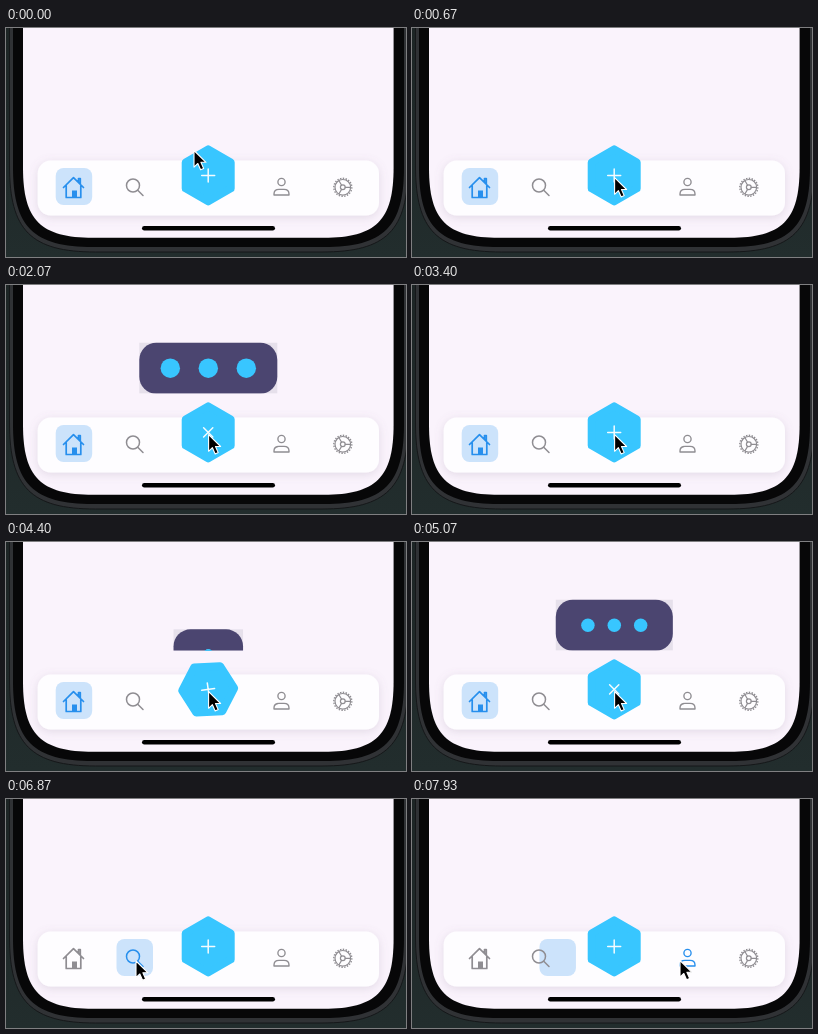
Write an HTML page that moves like this. It is 400x229 px and loops after 8 s.

```html
<!DOCTYPE html>
<html lang="en">
<head>
<meta charset="utf-8">
<title>Tab bar with expanding menu</title>
<style>
  html, body { margin: 0; width: 100%; height: 100%; overflow: hidden; background: #172121; }
  svg { display: block; width: 100%; height: 100%; }
  .line { fill: none; stroke: currentColor; stroke-width: 1.5; stroke-linecap: round; stroke-linejoin: round; }
  .tab { color: #8f8d92; }
  .tab.active { color: #278fed; }
</style>
</head>
<body>
<svg viewBox="0 0 400 229">
  <defs>
    <linearGradient id="desk" x2="0" y2="1">
      <stop offset="0" stop-color="#1d2525"/>
      <stop offset="1" stop-color="#222d2d"/>
    </linearGradient>
    <filter id="soft" x="-10%" y="-40%" width="120%" height="180%">
      <feDropShadow dx="0" dy="2" stdDeviation="5" flood-color="#80708c" flood-opacity=".2"/>
    </filter>
    <clipPath id="aboveBar"><rect width="400" height="108.5"/></clipPath>
  </defs>

  <!-- phone -->
  <rect width="400" height="229" fill="url(#desk)"/>
  <path id="frame" fill="#303235" stroke="#151719"/>
  <path id="bezel" fill="#070708"/>
  <path id="screen" fill="#faf3fc"/>
  <rect x="136" y="197.9" width="133" height="4.6" rx="2.3" fill="#000"/>

  <!-- menu -->
  <g clip-path="url(#aboveBar)">
    <g id="menu">
      <rect class="panel" y="-25.5" height="51" fill="#e6e0eb"/>
      <rect class="panel" y="-25.5" height="51" rx="17" fill="#4b4570"/>
      <g fill="#38c6ff">
        <circle class="dot"/><circle class="dot"/><circle class="dot"/>
      </g>
      <g id="actions" class="line" color="#f4f2fa" style="stroke-width:1.2">
        <path d="M-47 -5.5h3.5l2 -2.5h5l2 2.5h3.5q2 0 2 2v9.5q0 2 -2 2h-16q-2 0 -2 -2v-9.5q0 -2 2 -2z"/>
        <circle cx="-39" cy="1" r="4.4"/><path d="M-32.5 -2.5h.4"/>
        <rect x="-3" y="-9" width="6.4" height="12" rx="3.2"/>
        <path d="M-5.5 -1v1.5a5.7 5.7 0 0 0 11.4 0V-1M.2 6.3V9M-3 9h6.4"/>
        <path d="M33.5 -6.8V6.8L45 0z"/>
      </g>
    </g>
  </g>

  <!-- tab bar -->
  <rect x="31.7" y="132.6" width="341.3" height="54.9" rx="13" fill="#fefdff" filter="url(#soft)"/>
  <rect id="highlight" y="140" width="36.5" height="37" rx="8" fill="#cce3fb"/>
  <g class="tab line" style="stroke-width:1.7">
    <path d="M57.5 159.5L67.5 149.7L77.5 159.5M60.2 157.5v12h14.6v-12M74.3 156v-5.5h-1.8v3.5"/>
    <rect x="66" y="162.5" width="5" height="7" fill="currentColor" stroke="none"/>
  </g>
  <g class="tab line">
    <circle cx="127" cy="157.5" r="6.5"/><path d="M132 162.5l5 5"/>
  </g>
  <g class="tab line" style="stroke-width:1.35">
    <circle cx="275.5" cy="154" r="3.6"/>
    <path d="M268 167v-1q0 -4.6 5 -4.6h5q5 0 5 4.6v1z"/>
  </g>
  <g class="tab line" transform="translate(336.8 159.3)" style="stroke-width:1.2">
    <circle r="7.8"/>
    <circle r="9" pathLength="40" stroke-dasharray="1 1" style="stroke-width:1.4;stroke-linecap:butt"/>
    <circle r="2.4"/>
    <path d="M2.4 0H7.5M-1.2 -2.1L-3.8 -6.5M-1.2 2.1L-3.8 6.5"/>
  </g>

  <!-- button -->
  <g transform="translate(202.2 147.4)">
    <path id="hexagon" d="M0 -26L22.5 -13V13L0 26L-22.5 13V-13z" fill="#38c6ff" stroke="#38c6ff" stroke-width="8" stroke-linejoin="round"/>
    <path id="plus" class="line" color="#f4fcff" d="M-6.5 0h13M0 -6.5v13"/>
  </g>

  <path id="cursor" d="M0 0V16.6L3.8 13L6.6 19.2L9.6 17.9L6.9 11.8H12z" fill="#000" stroke="#fff" stroke-width="1.1" stroke-linejoin="round"/>
</svg>

<script>
const LOOP = 8000;
const OPEN_TIME = 1600, CLOSE_TIME = 700, SPIN_TIME = 500;
const MENU_RUNS = [[700, 2700], [4250, 6060]];
const SELECT_SEARCH = 6050, SELECT_USER = 7835, SLIDE_TIME = 400;

// time, x, y
const CURSOR_PATH = [
  [0, 188, 122.5], [500, 202.6, 149.7], [5400, 202.6, 149.7], [5870, 147.5, 171],
  [6030, 130, 162], [7050, 130, 162], [7700, 268, 161.5], [LOOP, 268, 161.5]
];

const $ = id => document.getElementById(id);
const all = selector => [...document.querySelectorAll(selector)];
const panels = all('.panel'), dots = all('.dot'), tabs = all('.tab');

const lerp = (a, b, p) => a + (b - a) * p;
const progress = (t, start, duration) => Math.min(1, Math.max(0, (t - start) / duration));
const easeInOut = p => p < .5 ? 2 * p * p : 1 - 2 * (1 - p) ** 2;
const easeOut = p => 1 - (1 - p) ** 2;
const eased = (t, start, duration) => easeInOut(progress(t, start, duration));

// Phone outline with long, continuous bottom corners.
function shapePhone(id, left, right, bottom, corner) {
  const handle = corner / 4;
  $(id).setAttribute('d', `M${left} -9V${bottom - corner}
    C${left} ${bottom - handle} ${left + handle} ${bottom} ${left + corner} ${bottom}
    H${right - corner}
    C${right - handle} ${bottom} ${right} ${bottom - handle} ${right} ${bottom - corner}V-9z`);
}

function drawMenu(clock) {
  const rise = easeOut(progress(clock, 0, 620));
  const widen = eased(clock, 620, 330);
  const reveal = eased(clock, 1430, 160);
  const width = lerp(69.5, 138, widen);
  const firstDot = 5.5 * (1 - progress(clock, 150, 450));
  const radius = Math.max(firstDot, 9.7 * widen) * (1 - reveal);

  $('menu').setAttribute('transform', `translate(202.3 ${lerp(135, 83.2, rise)})`);
  for (const panel of panels) {
    panel.setAttribute('x', -width / 2);
    panel.setAttribute('width', width);
  }
  dots.forEach((dot, i) => {
    dot.setAttribute('cx', (i - 1) * 38 * widen);
    dot.setAttribute('r', radius);
  });
  $('actions').setAttribute('opacity', reveal);
}

function drawTabs(t) {
  const selected = t < SELECT_SEARCH ? 0 : t < SELECT_USER ? 1 : 2;
  tabs.forEach((tab, i) => tab.classList.toggle('active', i === selected));
  const x = 49.7 + 60.8 * eased(t, SELECT_SEARCH, SLIDE_TIME)
                 + 147 * eased(t, SELECT_USER, SLIDE_TIME);
  $('highlight').setAttribute('x', x);
}

function drawCursor(t) {
  const next = Math.max(1, CURSOR_PATH.findIndex(([time]) => time > t));
  const [t0, x0, y0] = CURSOR_PATH[next - 1], [t1, x1, y1] = CURSOR_PATH[next];
  const p = eased(t, t0, t1 - t0);
  $('cursor').setAttribute('transform', `translate(${lerp(x0, x1, p)} ${lerp(y0, y1, p)})`);
}

function draw(t) {
  let clock = 0, spin = 0;
  for (const [open, close] of MENU_RUNS) {
    clock += OPEN_TIME * (progress(t, open, OPEN_TIME) - progress(t, close, CLOSE_TIME));
    spin += eased(t, open, SPIN_TIME) - eased(t, close, SPIN_TIME);
  }
  drawMenu(clock);
  $('hexagon').setAttribute('transform', `rotate(${-180 * spin})`);
  $('plus').setAttribute('transform', `rotate(${-45 * spin})`);
  drawTabs(t);
  drawCursor(t);
}

shapePhone('frame', 3.5, 402, 224, 86);
shapePhone('bezel', 7, 398, 219, 80);
shapePhone('screen', 17, 387.6, 209.8, 70);

const start = performance.now();
function tick() {
  draw((performance.now() - start) % LOOP);
  requestAnimationFrame(tick);
}
tick();
</script>
</body>
</html>
```
